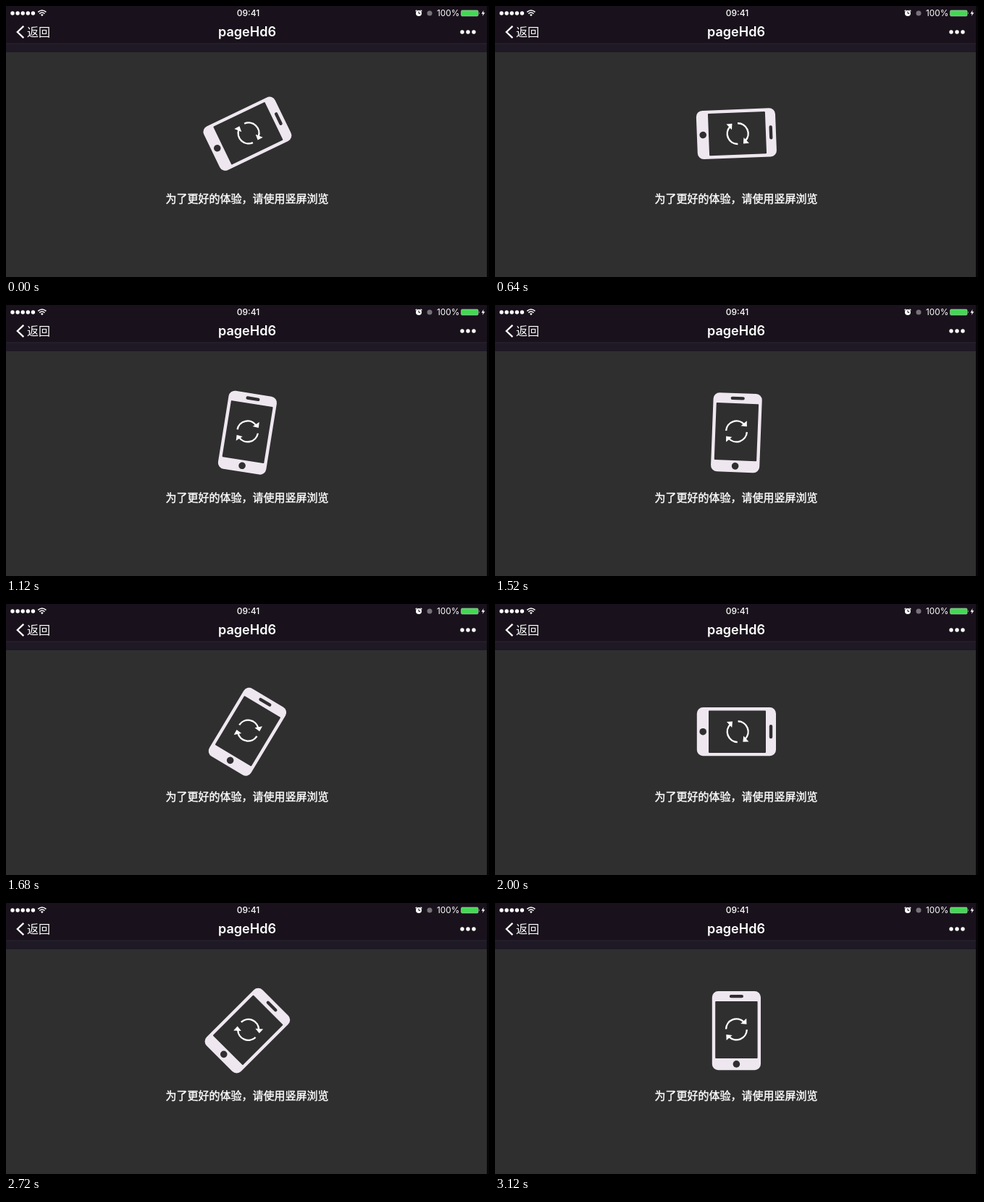
These frames come from a looping animation (667 by 375 pixels, 3.28 s). An HTML page:

```html
<!DOCTYPE html>
<html lang="zh-CN">
<head>
<meta charset="utf-8">
<style>
  html, body { margin: 0; width: 100%; height: 100%; overflow: hidden; background: #2f2f2f; }
  svg { display: block; width: 667px; height: 375px; }
  text { fill: #fff; font-family: Inter, "Noto Sans CJK SC", "Noto Sans CJK", sans-serif; }
  .line { fill: none; stroke: #fff; }
</style>
</head>
<body>
<svg viewBox="0 0 667 375">
  <rect width="667" height="375" fill="#2f2f2f"/>
  <rect width="667" height="64" fill="#1e1925"/>
  <rect width="667" height="52" fill="#19121c"/>
  <rect y="51.5" width="667" height="1" fill="#2c2633"/>
  <rect x="664" width="3" height="375" fill="#080609"/>

  <!-- status bar -->
  <g fill="#fff">
    <circle cx="9" cy="10" r="2.7"/>
    <circle cx="16.1" cy="10" r="2.7"/>
    <circle cx="23.2" cy="10" r="2.7"/>
    <circle cx="30.3" cy="10" r="2.7"/>
    <circle cx="37.4" cy="10" r="2.7"/>
    <path d="M47.9 12.1Q49.8 10.5 51.7 12.1L49.8 14.2Z"/>
    <path d="M659.5 6L656.6 10.7H658.7L658 14L661.4 9.2H659.2Z"/>
  </g>
  <path class="line" stroke-width="1.5" d="M44.2 8.4Q49.8 3.6 55.4 8.4M46.2 10.6Q49.8 7.4 53.4 10.6"/>
  <text x="334.5" y="14.3" font-size="12" font-weight="500" text-anchor="middle">09:41</text>
  <circle cx="570" cy="10" r="4" fill="#fff"/>
  <path class="line" stroke-width="1.2" d="M565.6 7.2L567.4 5.6M574.4 7.2L572.6 5.6"/>
  <path fill="none" stroke="#19121c" d="M570 7.6V10.3H572.2"/>
  <circle cx="585" cy="10" r="3.5" fill="#77727a"/>
  <text x="626.3" y="14.3" font-size="11.8" text-anchor="end">100%</text>
  <rect x="628.6" y="6.1" width="23.4" height="7.8" rx="1.3" fill="#43d854" stroke="#a9c9ad" stroke-width=".8"/>
  <path d="M653.2 8.4Q654.8 10 653.2 11.6Z" fill="#c5d8c8"/>

  <!-- title bar -->
  <path class="line" stroke-width="2.3" d="M24.3 27.8L15.8 36L24.3 44.2"/>
  <text x="29" y="42" font-size="16">返回</text>
  <text x="333" y="42.3" font-size="18" font-weight="600" text-anchor="middle">pageHd6</text>
  <g fill="#fff">
    <circle cx="630" cy="36" r="2.7"/>
    <circle cx="638" cy="36" r="2.7"/>
    <circle cx="646" cy="36" r="2.7"/>
  </g>

  <!-- phone, upright around its own centre -->
  <g id="phone">
    <rect x="-33.6" y="-54.6" width="67.2" height="109.2" rx="8.5" fill="#efe7f0"/>
    <g fill="#2f2f2f">
      <rect x="-29.2" y="-40.6" width="58.4" height="79" rx="1"/>
      <rect x="-9.6" y="-49.8" width="19.2" height="4.4" rx="2.2"/>
      <circle cy="46.2" r="4.8"/>
    </g>
    <g transform="translate(0 -1.8)">
      <g id="arrow">
        <path class="line" stroke-width="2.4" d="M-14.4 -.4A14.4 14.4 0 0 1 10.2 -10.2"/>
        <path fill="#fff" d="M13.8 -15.2L14.1 -7.2L5.8 -8Z"/>
      </g>
      <use href="#arrow" transform="rotate(180)"/>
    </g>
  </g>

  <text x="220.5" y="272.1" font-size="15" stroke="#fff" stroke-width=".4">为了更好的体验，请使用竖屏浏览</text>
</svg>
<script>
  const LOOP = 3280, STEP = 80, CYCLE = 1800;
  const phone = document.getElementById('phone');

  // cubic-bezier(.42, 0, .58, 1), solved for x by bisection
  function easeInOut(x) {
    let lo = 0, hi = 1;
    for (let i = 0; i < 24; i++) {
      const s = (lo + hi) / 2, r = 1 - s;
      if (1.26 * r * r * s + 1.74 * r * s * s + s ** 3 < x) lo = s; else hi = s;
    }
    return lo * lo * (3 - 2 * lo);
  }

  // each cycle: tip over 30%, rest 20%, stand up 40%, rest 10%
  function angle(time) {
    const p = (time + 340) % CYCLE / CYCLE;
    if (p < .3) return 90 * easeInOut(p / .3);
    if (p < .5) return 90;
    if (p < .9) return 90 * (1 - easeInOut((p - .5) / .4));
    return 0;
  }

  const start = performance.now();
  function draw() {
    const time = (performance.now() - start) % LOOP;
    const tick = Math.floor(time / STEP) * STEP;
    phone.setAttribute('transform', `translate(333.4 176.7) rotate(${angle(tick)})`);
    requestAnimationFrame(draw);
  }
  draw();
</script>
</body>
</html>
```
